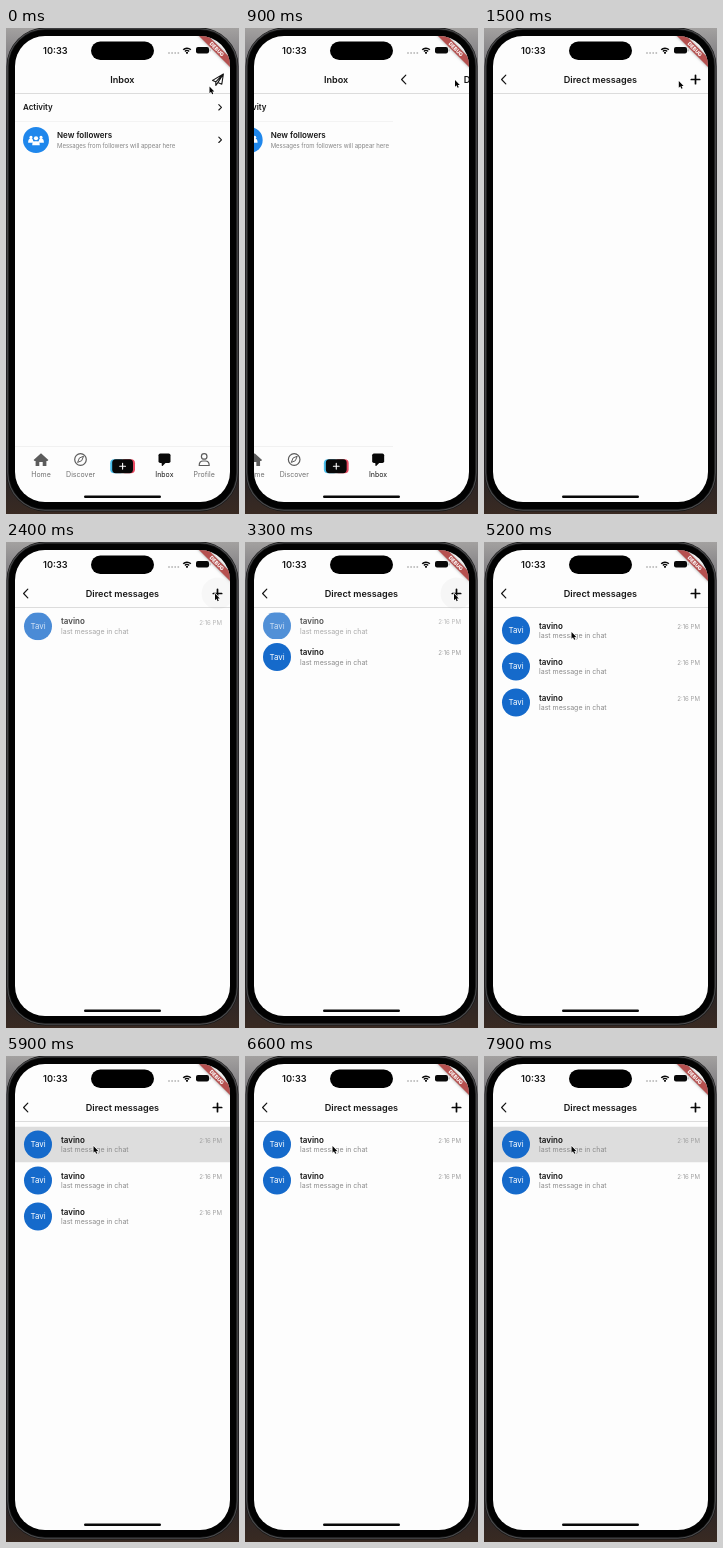
An HTML page with a canvas that plays this animation: 233x486 px, repeating every 8 s.

```html
<!DOCTYPE html>
<html lang="en">
<head>
<meta charset="utf-8">
<title>Direct messages</title>
<style>
html, body { margin: 0; width: 100%; height: 100%; overflow: hidden; background: #000; }
canvas { display: block; width: 233px; height: 486px; }
</style>
</head>
<body>
<canvas id="stage"></canvas>
<script>
const W = 233, H = 486, LOOP = 8000;
const SCREEN = { x: 9, y: 8, w: 215, h: 466, r: 30 };
const PAPER = '#fdfdfd', INK = '#161616', BLUE = '#156acb';
const LIST_TOP = 70.5, ROW = 36, GROW = 300;

const canvas = document.getElementById('stage');
const dpr = window.devicePixelRatio || 1;
canvas.width = W * dpr;
canvas.height = H * dpr;
const c = canvas.getContext('2d');

// Newest row first.
const rows = [
  { added: 4000, removed: 6000, pressed: 5550 },
  { added: 3080, pressed: 7550 },
  { added: 2170 }
];
const plusTaps = [2170, 3080, 4000];

// Pointer path: time, x, y.
const path = [
  [0, 203.5, 58.5], [100, 203.5, 58.5], [300, 210, 52], [1200, 210, 52],
  [1500, 194.8, 53], [1900, 209, 51.5], [4550, 209, 51.5],
  [5150, 87.5, 90], [LOOP, 87.5, 90]
];

const clamp = v => Math.max(0, Math.min(1, v));
const ramp = (t, start, len) => clamp((t - start) / len);
const smooth = v => v * v * (3 - 2 * v);

function bezierEase(x1, y1, x2, y2) {
  const at = (a, b, s) => 3 * a * s * (1 - s) ** 2 + 3 * b * s * s * (1 - s) + s ** 3;
  return x => {
    let lo = 0, hi = 1;
    for (let i = 0; i < 20; i++) {
      const mid = (lo + hi) / 2;
      if (at(x1, x2, mid) < x) lo = mid; else hi = mid;
    }
    return at(y1, y2, hi);
  };
}
const slideEase = bezierEase(0.35, 0.91, 0.33, 0.97);

function text(str, x, y, size, color = INK, weight = 400, align = 'left') {
  c.font = `${weight} ${size}px Inter, "Noto Sans", sans-serif`;
  c.textAlign = align;
  c.fillStyle = color;
  c.fillText(str, x, y);
}

function box(x, y, w, h, r, color) {
  c.beginPath();
  c.roundRect(x, y, w, h, r);
  c.fillStyle = color;
  c.fill();
}

function disc(x, y, r, color) {
  c.beginPath();
  c.arc(x, y, r, 0, Math.PI * 2);
  c.fillStyle = color;
  c.fill();
}

function pen(color, width) {
  c.strokeStyle = color;
  c.lineWidth = width;
  c.lineCap = c.lineJoin = 'round';
}

function stroke(d, color, width) {
  pen(color, width);
  c.stroke(new Path2D(d));
}

function fill(d, color) {
  c.fillStyle = color;
  c.fill(new Path2D(d));
}

function rule(y, color) {
  c.fillStyle = color;
  c.fillRect(SCREEN.x, y, SCREEN.w, 1);
}

function page() {
  c.fillStyle = PAPER;
  c.fillRect(SCREEN.x, SCREEN.y, SCREEN.w, SCREEN.h);
  rule(65, '#dcdcdc');
}

function ripple(t, x, y, taps) {
  for (const tap of taps) {
    const a = ramp(t, tap - 180, 150) * (1 - ramp(t, tap + 100, 300));
    if (a > 0) disc(x, y, 16, `rgba(0,0,0,${0.045 * a})`);
  }
}

function group(x, y) {
  const person = (px, py, s) => {
    disc(px, py - 2.6 * s, 2 * s, '#fff');
    fill(`M${px - 3.6 * s} ${py + 4 * s}q0 -4 ${2.6 * s} -4h${2 * s}q${2.6 * s} 0 ${2.6 * s} 4z`, '#fff');
  };
  person(x - 5, y - 0.5, 0.8);
  person(x + 5, y - 0.5, 0.8);
  pen('#1f87ec', 1.2);
  c.beginPath();
  c.arc(x, y - 1.6, 2.8, 0, 7);
  c.stroke();
  person(x, y + 1, 1.05);
}

function navBar() {
  const gray = '#5c5c5c', label = '#707070';
  rule(418, '#f1f1f1');

  fill('M27.6 432L35 425.3L42.4 432L41.4 433H40.4V438H36.7V434H33.3V438H29.6V433H28.6Z', gray);
  pen(gray, 1.2);
  c.beginPath();
  c.arc(74.5, 431.5, 5.8, 0, 7);
  c.stroke();
  stroke('M77.4 428.6L75.7 432.7L71.6 434.4L73.3 430.3Z', gray, 1);

  box(104.2, 431.2, 14, 14, 4, '#49bdea');
  box(115, 431.2, 14, 14, 4, '#e94a62');
  box(106.2, 431.2, 20.8, 14, 3.6, '#080808');
  stroke('M113.7 438.2H119.5M116.6 435.3V441.1', '#fff', 1.1);

  box(152.5, 425.5, 12, 9.5, 1.8, '#080808');
  fill('M155.5 434H160.5L156.5 438Q155.8 438.4 155.8 437.4Z', '#080808');

  pen(gray, 1.2);
  c.beginPath();
  c.arc(198.2, 428.4, 2.8, 0, 7);
  c.stroke();
  stroke('M193.2 437.5Q193.2 433 197 433H199.4Q203.2 433 203.2 437.5Z', gray, 1.2);

  text('Home', 35, 449, 7, label, 400, 'center');
  text('Discover', 74.6, 449, 7, label, 400, 'center');
  text('Inbox', 158.4, 449, 7, INK, 400, 'center');
  text('Profile', 198.2, 449, 7, label, 400, 'center');
}

function inboxPage(t) {
  page();
  text('Inbox', 116.4, 55, 9.1, INK, 600, 'center');
  ripple(t, 212, 51.5, [820]);
  stroke('M206.6 52.4L217.4 46L215.8 56.2L211.8 54.6L209.8 57.4V53.8L206.6 52.4M209.8 53.8L217.4 46M211.8 54.6L217.4 46', INK, 1.1);

  text('Activity', 17, 82.4, 8, INK, 600);
  rule(93, '#f3f3f3');
  for (const y of [79.3, 111.8])
    stroke(`M212.8 ${y - 2.7}L215.5 ${y}L212.8 ${y + 2.7}`, INK, 1.1);

  disc(30, 112, 13, '#1f87ec');
  group(30, 112);
  text('New followers', 51, 109.8, 8, INK, 600);
  text('Messages from followers will appear here', 51, 120, 6, '#858585');
  navBar();
}

function tile(mid) {
  disc(32, mid, 14, BLUE);
  text('Tavi', 32, mid + 2.8, 7.9, '#fff', 400, 'center');
  text('tavino', 55, mid - 2, 8, INK, 600);
  text('last message in chat', 55, mid + 7.8, 7, '#8a8a8a');
  text('2:16 PM', 216, mid - 1.7, 6.1, '#a0a0a0', 400, 'right');
}

function chatList(t) {
  let top = LIST_TOP;
  for (const row of rows) {
    const leaving = row.removed !== undefined && t >= row.removed;
    const shown = ramp(t, row.added, GROW);
    const size = leaving ? 1 - ramp(t, row.removed, GROW) : shown;
    if (size <= 0) continue;
    const h = ROW * size;
    c.save();
    c.beginPath();
    c.rect(SCREEN.x, top, SCREEN.w, h);
    c.clip();
    c.globalAlpha = shown;
    if (row.pressed !== undefined && !leaving) {
      c.fillStyle = `rgba(0,0,0,${0.125 * ramp(t, row.pressed, 220)})`;
      c.fillRect(SCREEN.x, top, SCREEN.w, h);
    }
    tile(top + h / 2);
    c.restore();
    top += h;
  }
}

function chatPage(t) {
  page();
  text('Direct messages', 116.4, 55, 9.1, INK, 600, 'center');
  stroke('M21.8 47.2L17.6 51.5L21.8 55.8', INK, 1.2);
  ripple(t, 211.5, 51.5, plusTaps);
  stroke('M207.3 51.5H215.7M211.5 47.3V55.7', '#080808', 1.7);
  chatList(t);
}

function statusBar() {
  text('10:33', 49.3, 26, 9.2, INK, 600, 'center');
  box(85, 13.5, 63, 18.5, 9.25, '#000');
  for (let i = 0; i < 4; i++) disc(163 + i * 3.1, 25, 0.95, '#bcbcbc');
  pen('#080808', 1.4);
  c.lineCap = 'butt';
  for (const r of [2.9, 5.2]) {
    c.beginPath();
    c.arc(181, 25.4, r, -Math.PI * 0.76, -Math.PI * 0.24);
    c.stroke();
  }
  disc(181, 24.8, 1.1, '#080808');
  box(190, 19, 13, 6.6, 2, '#080808');
  box(203.5, 21.2, 1, 2.2, 0.5, '#999');
}

function banner() {
  c.save();
  c.translate(SCREEN.x + SCREEN.w, SCREEN.y);
  c.rotate(Math.PI / 4);
  c.shadowColor = 'rgba(0,0,0,.4)';
  c.shadowBlur = 3 * dpr;
  c.fillStyle = '#b5504f';
  c.fillRect(-24, 15.3, 48, 6.6);
  c.shadowColor = 'transparent';
  text('DEBUG', 0, 20.5, 5.2, '#fff', 800, 'center');
  c.restore();
}

function phone() {
  const back = c.createLinearGradient(0, 0, 0, H);
  back.addColorStop(0, '#a3a1a0');
  back.addColorStop(0.08, '#77757a');
  back.addColorStop(0.2, '#3a393c');
  back.addColorStop(0.9, '#252327');
  back.addColorStop(1, '#392a22');
  c.fillStyle = back;
  c.fillRect(0, 0, W, H);
  box(0.5, -0.5, 232, 484, 39, '#161616');
  c.beginPath();
  c.roundRect(1.7, 0.8, 229.6, 481.4, 37.5);
  pen('#4b4b4d', 1.1);
  c.stroke();
  box(3, 2, 227, 479, 36, '#020202');
}

function pointer(t) {
  const i = Math.max(1, path.findIndex(p => p[0] > t));
  const [t0, x0, y0] = path[i - 1], [t1, x1, y1] = path[i];
  const k = smooth(ramp(t, t0, t1 - t0));
  c.save();
  c.translate(x0 + (x1 - x0) * k, y0 + (y1 - y0) * k);
  const arrow = 'M0 0V6.7L1.5 5.3L2.6 7.8L3.8 7.3L2.7 4.9H4.8Z';
  stroke(arrow, '#fff', 1.1);
  fill(arrow, '#050505');
  c.restore();
}

function draw(t) {
  c.setTransform(dpr, 0, 0, dpr, 0, 0);
  phone();
  c.save();
  c.beginPath();
  c.roundRect(SCREEN.x, SCREEN.y, SCREEN.w, SCREEN.h, SCREEN.r);
  c.clip();

  const slide = t < 840 ? 0 : slideEase(ramp(t, 840, 450));
  if (slide < 1) {
    c.save();
    c.translate(-SCREEN.w / 3 * slide, 0);
    inboxPage(t);
    c.restore();
  }
  if (slide > 0) {
    c.save();
    c.translate(SCREEN.w * (1 - slide), 0);
    chatPage(t);
    c.restore();
  }

  statusBar();
  banner();
  box(78, 467.4, 77, 2.5, 1.25, '#080808');
  c.restore();
  pointer(t);
}

const start = performance.now();
function tick() {
  draw((performance.now() - start) % LOOP);
  requestAnimationFrame(tick);
}
tick();
</script>
</body>
</html>
```
